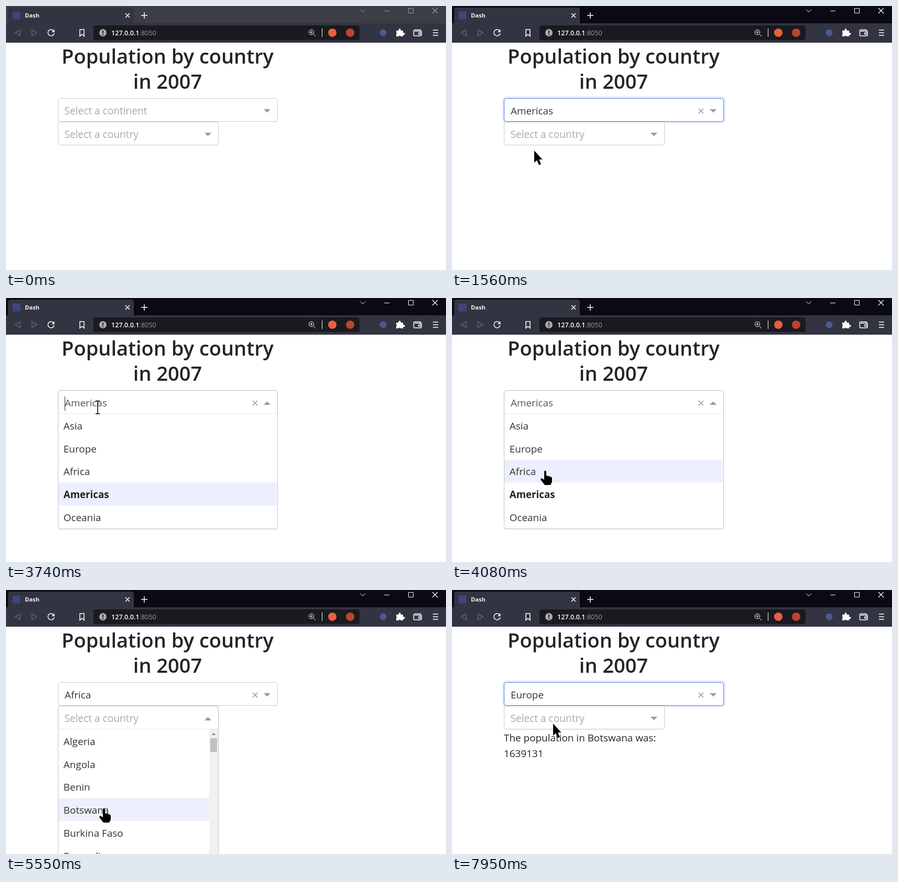
Recreate the animation shown at these times as an HTML page. Size 840x504 px, loop 8000 ms.

```html
<!DOCTYPE html>
<html lang="en">
<head>
<meta charset="utf-8">
<title>Dash</title>
<style>
  html, body { margin: 0; width: 100%; height: 100%; overflow: hidden; background: #fff; }
  svg { display: block; font: 18.9px "Open Sans", "Noto Sans", sans-serif; }
  .line { fill: none; stroke: #fff; stroke-width: 1.5; }
  .thin { stroke-width: 1; }
  .dim { stroke: #5a6080; }
  .title { font-size: 38px; font-weight: 600; fill: #212529; text-anchor: middle; }
  .hint { font-size: 19.1px; fill: #aaa; }
  .picked { font-weight: 700; font-size: 18.7px; }
  .url { font-size: 12.6px; }
  .host { font-weight: 600; fill: #fff; }
</style>
</head>
<body>
<svg width="840" height="504" viewBox="0 0 840 504">
  <rect width="840" height="504" fill="#fff"/>
  <rect id="titleBar" width="840" height="34"/>
  <path d="M4 33V8q0-5 5-5H239q5 0 5 5V33H840V70H0V33z" fill="#333441"/>
  <rect x="12.5" y="10.5" width="15" height="15" fill="#3b4779"/>
  <text x="36" y="22" font-size="11.2" font-weight="700" fill="#f0f0f3">Dash</text>
  <path class="line" d="M228 14l8 8m0-8l-8 8M258 18h12m-6-6v12"/>
  <g id="windowButtons" class="line thin">
    <path d="M676 6.500l5 5 5-5M722 9.500h10M768.500 4.500h9v9h-9z"/>
    <path d="M814 4l10 10m0-10l-10 10" stroke-width="1.300"/>
  </g>

  <path class="line dim" d="M27 45.500v11l-9.500-5.500zM49.500 45.500v11l9.500-5.500z"/>
  <path class="line" stroke-width="2" d="M91 47.500a6 6 0 1 0 1 4.500"/>
  <path d="M92.500 44.500v5.500h-5.500z" fill="#fff"/>
  <path class="line" d="M141 45h8v12.500l-4-3.500-4 3.500z"/>

  <rect x="167" y="37" width="508" height="28" rx="4" fill="#1a1a21"/>
  <circle cx="185" cy="51" r="7" fill="#a9a9ad"/>
  <path d="M184 47h2v5h-2zM184 53.500h2v2h-2z" fill="#1a1a21"/>
  <text class="url" x="201" y="55.500" fill="#9a9aa2"><tspan class="host">127.0.0.1</tspan>:8050</text>
  <g class="line thin" stroke="#ccc">
    <circle cx="583" cy="50" r="4.700"/>
    <path d="M586.500 53.500l4.500 4.500M580.500 50h5m-2.500-2.500v5M603.500 43v16"/>
  </g>
  <circle cx="623" cy="51" r="8" fill="#e8613a"/>
  <circle cx="657" cy="51" r="8" fill="#b8452f"/>
  <circle cx="720" cy="51" r="6.500" fill="#4a5a94"/>
  <path fill="#fff" d="M745 47h4.500a2.300 2.300 0 1 1 4 0H758v4.500a2.200 2.200 0 1 1 0 3.500V58h-4.500a2.200 2.200 0 0 0-4 0H745v-4a2.200 2.200 0 0 0 0-3.500z"/>
  <path class="line" d="M791 47.500V45.500H780q-1.500 0-1.500 2V55q0 2 2 2h11q1.500 0 1.500-1.500V48H780M793 51h-4q-1.500 0-1.500 1.500t1.500 1.500h4"/>
  <path class="line" d="M815 46h10m-10 5h10m-10 5h10"/>

  <text class="title" x="308.500" y="110">Population by country</text>
  <text class="title" x="308.500" y="158">in 2007</text>
  <g id="page"></g>
</svg>

<script>
const LOOP = 8000, ROW = 43.75, CLICK = 60, BLINK = 530;
const continents = ['Asia', 'Europe', 'Africa', 'Americas', 'Oceania'];
const countries = {
  Americas: ['Argentina', 'Bolivia', 'Brazil', 'Canada', 'Chile', 'Colombia'],
  Africa: ['Algeria', 'Angola', 'Benin', 'Botswana', 'Burkina Faso', 'Burundi'],
};
const totals = { Americas: 25, Africa: 52 };
const boxes = {
  continent: { y: 176, w: 419, hint: 'Select a continent' },
  country: { y: 221, w: 306, hint: 'Select a country' },
};

// Each step changes a few fields; press marks a mouse click.
const steps = [
  [0, {}],
  [760, { active: true, open: 'continent', focus: 'continent', press: 760 }],
  [1290, { continent: 'Americas', open: '', press: 1290 }],
  [1910, { open: 'country', focus: 'country', press: 1910 }],
  [2600, { country: 'Canada', open: '', press: 2600, filled: 2600 }],
  [2660, { result: ['Canada', 33390141] }],
  [3410, { open: 'continent', focus: 'continent', press: 3410 }],
  [4230, { continent: 'Africa', country: '', open: '', press: 4230 }],
  [4820, { open: 'country', focus: 'country', press: 4820 }],
  [5750, { country: 'Botswana', open: '', press: 5750, filled: 5750 }],
  [5820, { result: ['Botswana', 1639131] }],
  [6610, { open: 'continent', focus: 'continent', press: 6610 }],
  [7410, { continent: 'Europe', country: '', open: '', press: 7410 }],
];

// Pointer moves: start, end, number of steps, x, y
const moves = [
  [260, 400, 3, 240, 180], [470, 470, 1, 170, 158], [540, 610, 2, 175, 201],
  [890, 1090, 4, 165, 372],
  [1360, 1560, 4, 157, 276], [1630, 1770, 3, 163, 243],
  [2110, 2460, 6, 183, 427],
  [2730, 3210, 8, 175, 209],
  [3800, 4080, 4, 178, 330],
  [4300, 4620, 5, 179, 242],
  [5020, 5550, 9, 187, 417],
  [5820, 6480, 10, 190, 206],
  [6740, 6940, 4, 190, 247],
  [7080, 7210, 3, 191, 290],
  [7890, 7950, 2, 193, 255],
];

const pointers = {
  arrow: '<path d="M0 0V23L5 18.500 9 27.500 13 26 9.200 17H15.500z" stroke="#fff" paint-order="stroke"/>',
  beam: '<path d="M-4-12.500H4M0-12.500V12M-4 12H4" fill="none" stroke="#000" stroke-width="1.500"/>',
  hand: '<path d="M-2 1q2-3 4 0V9l8 2q3 1 3 4v6l-3 6H-1l-7-9q-2-3 1-4l5 3z" stroke="#fff" paint-order="stroke"/>',
};

const clamp = v => Math.max(0, Math.min(1, v));
const ease = p => p * p * (3 - 2 * p);
const rect = (x, y, w, h, attrs) => `<rect x="${x}" y="${y}" width="${w}" height="${h}" ${attrs}/>`;
const text = (x, y, s, attrs = 'fill="#333"') => `<text x="${x}" y="${y}" ${attrs}>${s}</text>`;

function stateAt(t) {
  return Object.assign({}, ...steps.filter(([at]) => at <= t).map(([, change]) => change));
}

function pointerAt(t) {
  let x = 580, y = 420;
  for (const [start, end, count, toX, toY] of moves) {
    if (t < start) break;
    const span = (end - start) / Math.max(1, count - 1) || 1;
    const done = Math.min(count, Math.floor((t - start) / span + 1.001));
    const p = ease(done / count);
    x += (toX - x) * p;
    y += (toY - y) * p;
  }
  return { x, y };
}

const inBox = (p, { y, w }) => p.x > 99 && p.x < 99 + w && p.y > y && p.y < y + 45;

function pointerKind(p, s) {
  const box = boxes[s.open];
  if (box && p.y > box.y + 45) return 'hand';
  if (box && inBox(p, box)) return 'beam';
  if (s.focus && inBox(p, boxes[s.focus])) return 'beam';
  if (s.result && p.x < 370 && p.y > 268 && p.y < 297) return 'beam';
  return 'arrow';
}

function select(name, s, t, p) {
  const { y, w, hint } = boxes[name];
  const open = s.open === name, focused = s.focus === name && !open;
  const value = s[name], mid = y + 24, right = 99.5 + w;
  let out = '';
  if (focused) out += rect(97.5, y - 1.5, w + 4, 48, 'rx="5" fill="none" stroke="#e3ebfd" stroke-width="3"');
  if (open || inBox(p, boxes[name])) out += rect(100, y + 2, w - 1, 44, 'rx="4" fill="#f0f0f0"');
  out += rect(99.5, y + 0.5, w, 44, `rx="4" fill="#fff" stroke="${focused ? '#4b7bee' : open ? '#bbb' : '#ccc'}"`);
  out += value
    ? text(112, y + 31, value, `fill="${open ? '#555' : '#333'}"`)
    : text(111.5, y + 31, hint, 'class="hint"');
  if (value) {
    const shown = name === 'country' ? clamp((t - s.filled - 20) / 200) : 1;
    out += `<path d="M${right - 47.5} ${mid - 4}l9 9m0-9l-9 9" stroke="#999" stroke-width="1.600" opacity="${shown}"/>`;
  }
  const tip = open ? `${mid + 4}h13l-6.500-6.500z` : `${mid - 3}h13l-6.500 6.500z`;
  out += `<path d="M${right - 26.5} ${tip}" fill="#999"/>`;
  if (open && (t - s.press) % (2 * BLINK) < BLINK) out += rect(112, y + 12, 1, 27, 'fill="#222"');
  return out;
}

function menu(s, p) {
  const { y, w } = boxes[s.open];
  const isCountry = s.open === 'country';
  const options = isCountry ? countries[s.continent] : continents;
  const top = y + 45, height = isCountry ? 250 : 5 * ROW;
  const focus = p.y > top ? Math.floor((p.y - top) / ROW) : Math.max(0, options.indexOf(s[s.open]));
  let out = rect(99.5, top + 10, w, height - 8, 'rx="4" fill="#e4e4e4"')
    + `<path d="M99.500 ${top - 4}V${top + height - 3}q0 4 4 4H${95.5 + w}q4 0 4-4V${top - 4}" fill="#fff" stroke="#c4c4c4"/>`
    + rect(100, top - 1, w - 1, 1, 'fill="#e6e6e6"')
    + rect(100, top + focus * ROW, w - (isCountry ? 17 : 2), ROW, 'fill="#ecf0fe"');
  options.forEach((name, i) => {
    const picked = name === s[s.open];
    const baseline = Math.floor(top + i * ROW + 30.3);
    out += text(109.8, baseline, name, picked ? 'class="picked" fill="#222"' : undefined);
  });
  if (isCountry) {
    const thumb = Math.max(26, 216 * 250 / (totals[s.continent] * ROW));
    out += rect(388, top, 17, height, 'fill="#f1f1f1"')
      + rect(390, top + 17, 13, thumb, 'fill="#c1c1c1"')
      + `<path d="M392.500 ${top + 11}h8l-4-4z" fill="#888"/>`;
  }
  return out;
}

function draw(t) {
  const s = stateAt(t), p = pointerAt(t);
  titleBar.setAttribute('fill', s.active ? '#0b0a14' : '#3d3d45');
  windowButtons.style.stroke = s.active ? '#fff' : '#98989d';
  let out = '';
  if (s.result) {
    out += text(99, 289, `The population in ${s.result[0]} was:`, 'fill="#212529"')
      + text(99, 319, s.result[1], 'fill="#212529"');
  }
  out += select('continent', s, t, p) + select('country', s, t, p);
  if (s.open) out += menu(s, p);
  if (t >= 260) {
    if (t - s.press < CLICK) out += `<circle cx="${p.x}" cy="${p.y}" r="12" fill="#ff0" opacity=".55"/>`;
    out += `<g transform="translate(${p.x} ${p.y})">${pointers[pointerKind(p, s)]}</g>`;
  }
  return out;
}

const titleBar = document.getElementById('titleBar');
const windowButtons = document.getElementById('windowButtons');
const page = document.getElementById('page');
const begin = performance.now();
let shown = '';

function tick() {
  const next = draw((performance.now() - begin) % LOOP);
  if (next !== shown) page.innerHTML = shown = next;
  requestAnimationFrame(tick);
}
tick();
</script>
</body>
</html>
```
